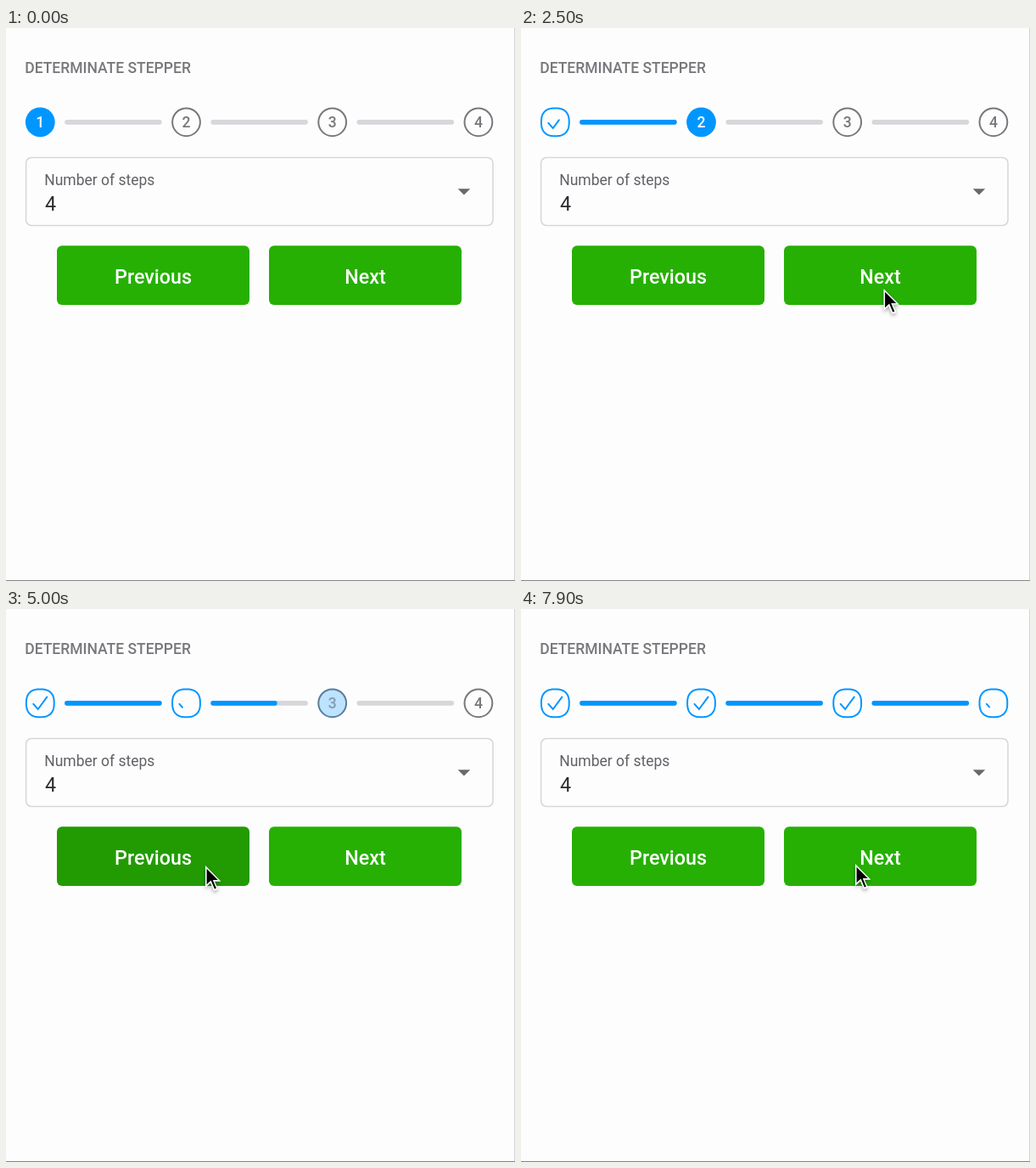
These frames come from a looping animation (600x651 px, 8000 ms). An HTML page with a canvas:

```html
<!DOCTYPE html>
<html lang="en">
<head>
<meta charset="utf-8">
<title>Stepper</title>
<style>
  html, body { margin: 0; width: 100%; height: 100%; overflow: hidden; background: #fefdfe; }
  canvas { display: block; }
</style>
</head>
<body>
<canvas id="stage" width="600" height="651"></canvas>
<script>
const ctx = document.getElementById('stage').getContext('2d');
const LOOP = 8000;
const BLUE = '#0096ff', GRAY = '#78777b', TRACK = '#d7d6da', GREEN = '#26b003', PAPER = '#fefdfe';
const STEP_Y = 110.8, STEP_R = 17.4, DONE_MS = 640;
const stepX = i => 40.3 + 172.2 * i;
const BUTTONS = [{ x: 60, label: 'Previous' }, { x: 310, label: 'Next' }];
const BUTTON_W = 227, BUTTON_Y = 256.3, BUTTON_H = 69.7;

const CLICKS = [
  { at: 1920, from: 0, to: 1 },
  { at: 3200, from: 1, to: 2 },
  { at: 4830, from: 2, to: 1 },
  { at: 5825, from: 1, to: 2 },
  { at: 6675, from: 2, to: 3 },
  { at: 7435, from: 3, to: 4 },
];

// Pointer tip: time, x, y
const POINTER = [
  [480, 602, 15], [780, 490, 366], [1100, 450.5, 341], [1300, 450, 311],
  [1700, 427.5, 307], [3650, 427.5, 307], [3900, 419, 309], [4150, 419, 309],
  [4500, 235, 302], [5000, 235, 302], [5550, 394, 300], [LOOP, 394, 300],
];

const ramp = (v, a, b) => Math.min(1, Math.max(0, (v - a) / (b - a)));
const mix = (a, b, p) => a + (b - a) * p;
const smooth = p => (1 - Math.cos(Math.PI * p)) / 2;

function pointerAt(t) {
  if (t < POINTER[0][0]) return null;
  const next = Math.max(1, POINTER.findIndex(k => k[0] >= t));
  const a = POINTER[next - 1], b = POINTER[next];
  const p = smooth(ramp(t, a[0], b[0]));
  return [mix(a[1], b[1], p), mix(a[2], b[2], p)];
}

function text(str, x, y, size, weight, color, align = 'left') {
  ctx.font = `${weight} ${size}px Roboto, sans-serif`;
  ctx.textAlign = align;
  ctx.fillStyle = color;
  ctx.fillText(str, x, y);
}

function box(x, y, w, h, r) {
  ctx.beginPath();
  ctx.roundRect(x, y, w, h, r);
}

function disc(x, y, r) {
  ctx.beginPath();
  ctx.arc(x, y, r, 0, 2 * Math.PI);
}

function polygon(points, color) {
  ctx.beginPath();
  points.forEach(([x, y]) => ctx.lineTo(x, y));
  ctx.closePath();
  ctx.fillStyle = color;
  ctx.fill();
}

function number(i, color) {
  text(i + 1, 0, 6.3, 17.5, 500, color, 'center');
}

// Gray ring (0) to filled disc (1)
function ringToDisc(i, p) {
  if (p < 1) {
    disc(0, 0, STEP_R - 1);
    ctx.strokeStyle = GRAY;
    ctx.lineWidth = 2;
    ctx.stroke();
    number(i, GRAY);
  }
  ctx.globalAlpha = p;
  disc(0, 0, STEP_R);
  ctx.fillStyle = BLUE;
  ctx.fill();
  number(i, '#fff');
  ctx.globalAlpha = 1;
}

// Disc shrinks, a rounded outline is traced, then the check mark
function discToCheck(i, ms) {
  const scale = 1 - ramp(ms, 0, 230) ** 2;
  if (scale > 0) {
    ctx.save();
    ctx.scale(scale, scale);
    ringToDisc(i, 1);
    ctx.restore();
  }
  ctx.strokeStyle = BLUE;
  ctx.lineWidth = 2;
  ctx.lineCap = 'round';
  const traced = ramp(ms, 70, 370);
  if (traced > 0) {
    const bulge = v => Math.sign(v) * Math.abs(v) ** 0.8 * (STEP_R - 1);
    ctx.beginPath();
    for (let k = 0; k <= 90; k++) {
      const a = 0.46 + 2 * Math.PI * traced * k / 90;
      ctx.lineTo(bulge(Math.cos(a)), bulge(Math.sin(a)));
    }
    ctx.stroke();
  }
  const ticked = ramp(ms, 430, 630);
  if (ticked > 0) {
    ctx.setLineDash([26.7 * ticked, 60]);
    ctx.beginPath();
    ctx.moveTo(-8, 1);
    ctx.lineTo(-2.6, 7.2);
    ctx.lineTo(8, -7.2);
    ctx.stroke();
    ctx.setLineDash([]);
  }
}

function drawStep(i, past) {
  const click = past.find(c => c.from === i || c.to === i);
  ctx.save();
  ctx.translate(stepX(i), STEP_Y);
  if (!click) {
    ringToDisc(i, i === 0 ? 1 : 0);
  } else {
    const forward = click.to > click.from;
    const fade = ramp(click.age, 60, 210);
    if (click.to === i && forward) ringToDisc(i, fade);
    else if (click.from === i && !forward) ringToDisc(i, 1 - fade);
    else discToCheck(i, forward ? click.age : Math.max(0, DONE_MS - click.age));
  }
  ctx.restore();
}

function drawTrack(i, past) {
  const x = stepX(i) + 28.8, w = 114.6;
  const click = past.find(c => Math.min(c.from, c.to) === i);
  let p = click ? smooth(ramp(click.age, 0, 450)) : 0;
  if (click && click.to < click.from) p = 1 - p;
  const bar = (width, color) => {
    box(x, 108, width, 5.7, 2.85);
    ctx.fillStyle = color;
    ctx.fill();
  };
  bar(w, TRACK);
  if (p > 0) bar(w * p, BLUE);
}

function drawButton({ x, label }) {
  box(x, BUTTON_Y, BUTTON_W, BUTTON_H, 6);
  ctx.fillStyle = GREEN;
  ctx.fill();
}

function drawRipple(click, t) {
  const age = t - click.at + 70;
  if (age < 0 || age > 375) return;
  const { x } = BUTTONS[click.to > click.from ? 1 : 0];
  const [px, py] = pointerAt(click.at);
  const grow = 1 - (1 - ramp(age, 0, 225)) ** 2;
  ctx.save();
  box(x, BUTTON_Y, BUTTON_W, BUTTON_H, 6);
  ctx.clip();
  disc(mix(px, x + BUTTON_W / 2, grow), mix(py, BUTTON_Y + BUTTON_H / 2, grow), 119 * grow);
  ctx.fillStyle = '#000';
  ctx.globalAlpha = 0.13 * ramp(age, 0, 75) * (1 - ramp(age, 225, 375));
  ctx.fill();
  ctx.restore();
}

function drawPointer(t) {
  const tip = pointerAt(t);
  if (!tip) return;
  ctx.save();
  ctx.translate(...tip);
  ctx.shadowColor = 'rgba(0,0,0,.35)';
  ctx.shadowBlur = 4;
  ctx.shadowOffsetY = 2;
  polygon([[0, 0], [0, 26], [6, 20.5], [10, 30], [15, 28], [11, 18.8], [18.5, 18.8]], '#fff');
  ctx.shadowColor = 'transparent';
  polygon([[1.6, 3.8], [1.6, 22.2], [6.6, 17.6], [10.8, 27.6], [12.9, 26.7], [8.8, 17.1], [14.8, 17.1]], '#000');
  ctx.restore();
}

function draw(t) {
  ctx.fillStyle = PAPER;
  ctx.fillRect(0, 0, 600, 651);

  text('DETERMINATE STEPPER', 22.2, 53.2, 17.5, 500, GRAY);

  const past = CLICKS.filter(c => c.at <= t).map(c => ({ ...c, age: t - c.at })).reverse();
  for (let i = 0; i < 3; i++) drawTrack(i, past);
  for (let i = 0; i < 4; i++) drawStep(i, past);

  box(23.6, 152.5, 550.4, 80, 6.5);
  ctx.strokeStyle = '#d6d5d9';
  ctx.lineWidth = 1.5;
  ctx.stroke();
  text('Number of steps', 45.2, 185.2, 17.5, 400, '#616065');
  text('4', 46, 214.6, 23.3, 400, '#2b2a2f');
  polygon([[532.6, 189.3], [547.2, 189.3], [539.9, 196.6]], '#69686c');

  BUTTONS.forEach(drawButton);
  CLICKS.forEach(c => drawRipple(c, t));
  BUTTONS.forEach(b => text(b.label, b.x + BUTTON_W / 2, 300.6, 23.3, 500, '#fff', 'center'));

  ctx.fillStyle = '#d3d2d4';
  ctx.fillRect(599, 0, 1, 651);
  ctx.fillStyle = '#858487';
  ctx.fillRect(0, 650, 600, 1);

  drawPointer(t);
}

const start = performance.now();
function tick() {
  draw((performance.now() - start) % LOOP);
  requestAnimationFrame(tick);
}
tick();
</script>
</body>
</html>
```
